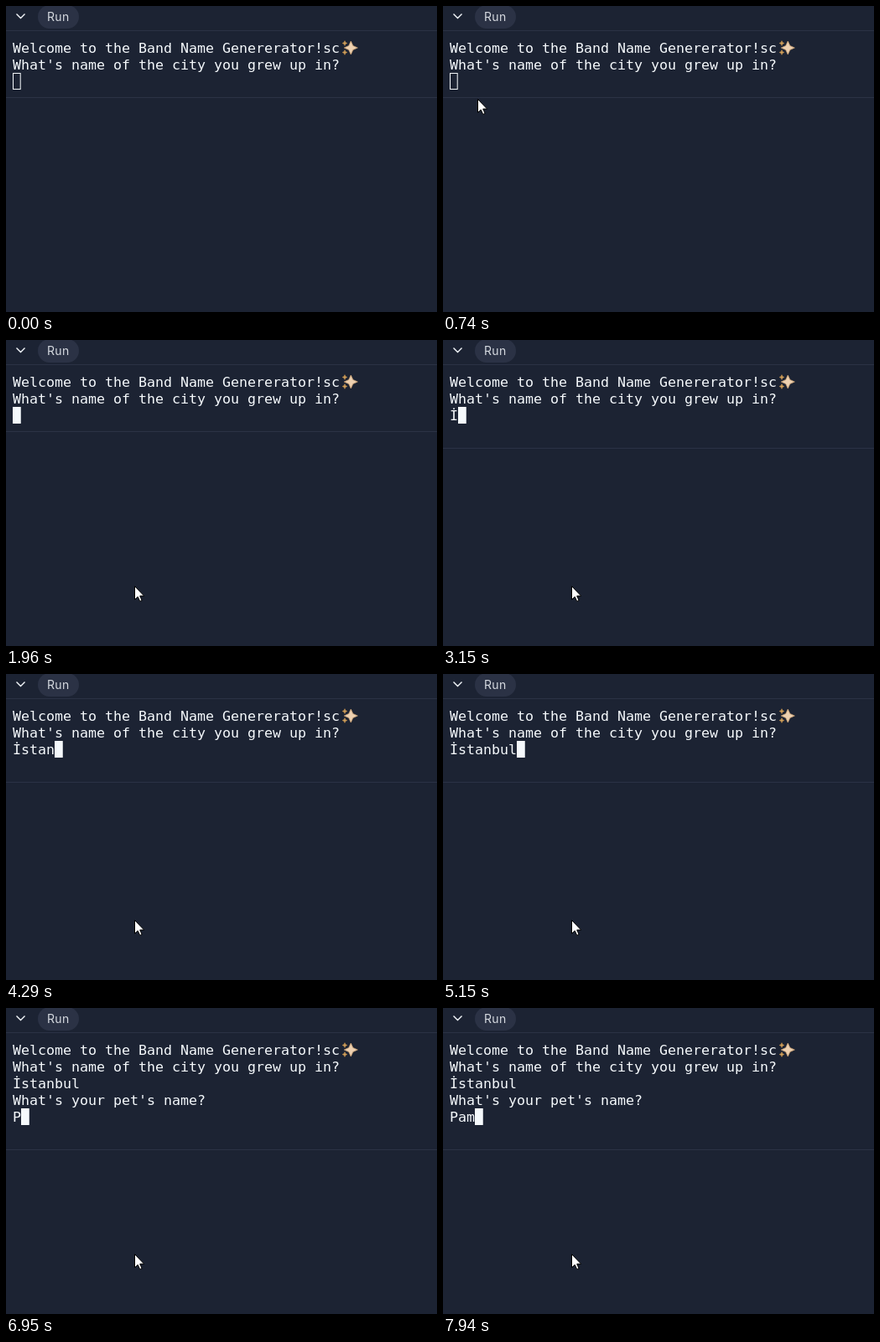
An HTML page for the animation above (8 s loop, 514 by 366 pixels).

```html
<!DOCTYPE html>
<html lang="en">
<head>
<meta charset="utf-8">
<title>Band name console</title>
<style>
  html, body { margin: 0; width: 100%; height: 100%; overflow: hidden; background: #1c2333; }
  svg { display: block; }
  #lines { font: 16.61px "DejaVu Sans Mono", monospace; fill: #f5f9fc; }
  #run { font: 14px Inter, sans-serif; letter-spacing: .3px; fill: #d6dae0; }
  .rule { fill: #2b3245; }
</style>
</head>
<body>
<svg width="514" height="366" viewBox="0 0 514 366">
  <rect width="514" height="366" fill="#1c2333"/>
  <path d="M12.5 9.5 17.5 14.5 22.5 9.5" fill="none" stroke="#f5f9fc" stroke-width="1.4"/>
  <rect class="rule" x="38" y="-1" width="49" height="28" rx="14"/>
  <text id="run" x="49" y="18">Run</text>
  <rect class="rule" y="29" width="514" height="1"/>
  <rect class="rule" id="bottom" width="514" height="1"/>
  <g id="lines"></g>
  <g id="sparkles" stroke-width=".8"></g>
  <rect id="caret" width="8.7" height="19" stroke="#f5f9fc"/>
  <path id="arrow" d="M.5.5V16.5L4.2 13.1 6.7 18.5 9.1 17.5 6.7 12.1H11.6Z" fill="#fff" stroke="#000"/>
  <path id="beam" d="M-3-7.5H-.5M.5-7.5H3M0-7V7M-3 7.5H-.5M.5 7.5H3" fill="none" stroke="#d5d9df"/>
</svg>
<script>
const LOOP = 8000, STEP = 750 / 11;
const SHOW = 200, REST = 1020, DRIFT = 1280, FOCUS = 1420, DEPART = 1550, PARK = 1960, ENTER = 5680;
const city = { text: "İstanbul", times: [3150, 3620, 3820, 4020, 4290, 4560, 4760, 5150] };
const pet = { text: "Pam", times: [6950, 7410, 7940] };

const $ = id => document.getElementById(id);
const add = (parent, tag, attrs) => {
  const el = document.createElementNS("http://www.w3.org/2000/svg", tag);
  for (const key in attrs) el.setAttribute(key, attrs[key]);
  return parent.appendChild(el);
};
const move = (el, x, y) => el.setAttribute("transform", `translate(${x} ${y})`);
const show = (el, on) => el.setAttribute("visibility", on ? "visible" : "hidden");

const rows = [0, 1, 2, 3, 4].map(i => add($("lines"), "text", { x: 8, y: 56 + 20 * i }));
rows[0].textContent = "Welcome to the Band Name Genererator!sc";
rows[1].textContent = "What's name of the city you grew up in?";

function star(x, y, r, fill, stroke) {
  const points = Array.from({ length: 8 }, (_, i) => {
    const radius = i % 2 ? r * 0.44 : r, angle = i * Math.PI / 4;
    return [x + radius * Math.cos(angle), y + radius * Math.sin(angle)];
  });
  add($("sparkles"), "polygon", { points: points.join(" "), fill, stroke });
}
star(411.3, 50, 8, "#edd0b0", "#c79f72");
for (const y of [44.5, 55.5]) star(404, y, 2.8, "#d8a860", "#b98a4c");

const progress = (t, from, to) => Math.min(1, Math.max(0, (t - from) / (to - from)));
const smooth = s => s * s * (3 - 2 * s);

// The pointer advances in discrete steps.
const snap = (t, from) => from + Math.floor((t - from + 8) / STEP) * STEP;

function pointerAt(t) {
  if (t < DRIFT) {
    const left = 1 - progress(snap(t, SHOW), SHOW, REST);
    return [37 + 263 * left ** 3.8, 83 + 240 * left ** 1.95];
  }
  const time = snap(t, DRIFT);
  const s = progress(time, DEPART, PARK);
  // Dips before leaving and overshoots before settling
  const swing = 0.12 * Math.sin(2 * Math.PI * s);
  return [
    37 - 6 * smooth(progress(time, DRIFT, DEPART)) + 122 * smooth(s),
    83 + 211 * (smooth(s) - swing)
  ];
}

function draw(t) {
  const typed = word => word.text.slice(0, word.times.filter(time => time <= t).length);
  const entered = t >= ENTER;
  rows[2].textContent = typed(city);
  rows[3].textContent = entered ? "What's your pet's name?" : "";
  rows[4].textContent = typed(pet);

  const count = typed(entered ? pet : city).length;
  const caretY = entered ? 120 : 80;
  move($("caret"), 8.5 + 10 * count, caretY + 0.5);
  $("caret").setAttribute("fill", t >= FOCUS ? "#f5f9fc" : "none");
  const bottom = caretY + (count ? 49 : 29);
  $("bottom").setAttribute("y", bottom);

  const [x, y] = pointerAt(t).map(Math.round);
  const overText = y < bottom;
  show($("arrow"), t >= SHOW && !overText);
  show($("beam"), t >= SHOW && overText);
  move($("arrow"), x, y);
  move($("beam"), x + 0.5, y);
}

function tick() {
  draw(performance.now() % LOOP);
  requestAnimationFrame(tick);
}
tick();
</script>
</body>
</html>
```
